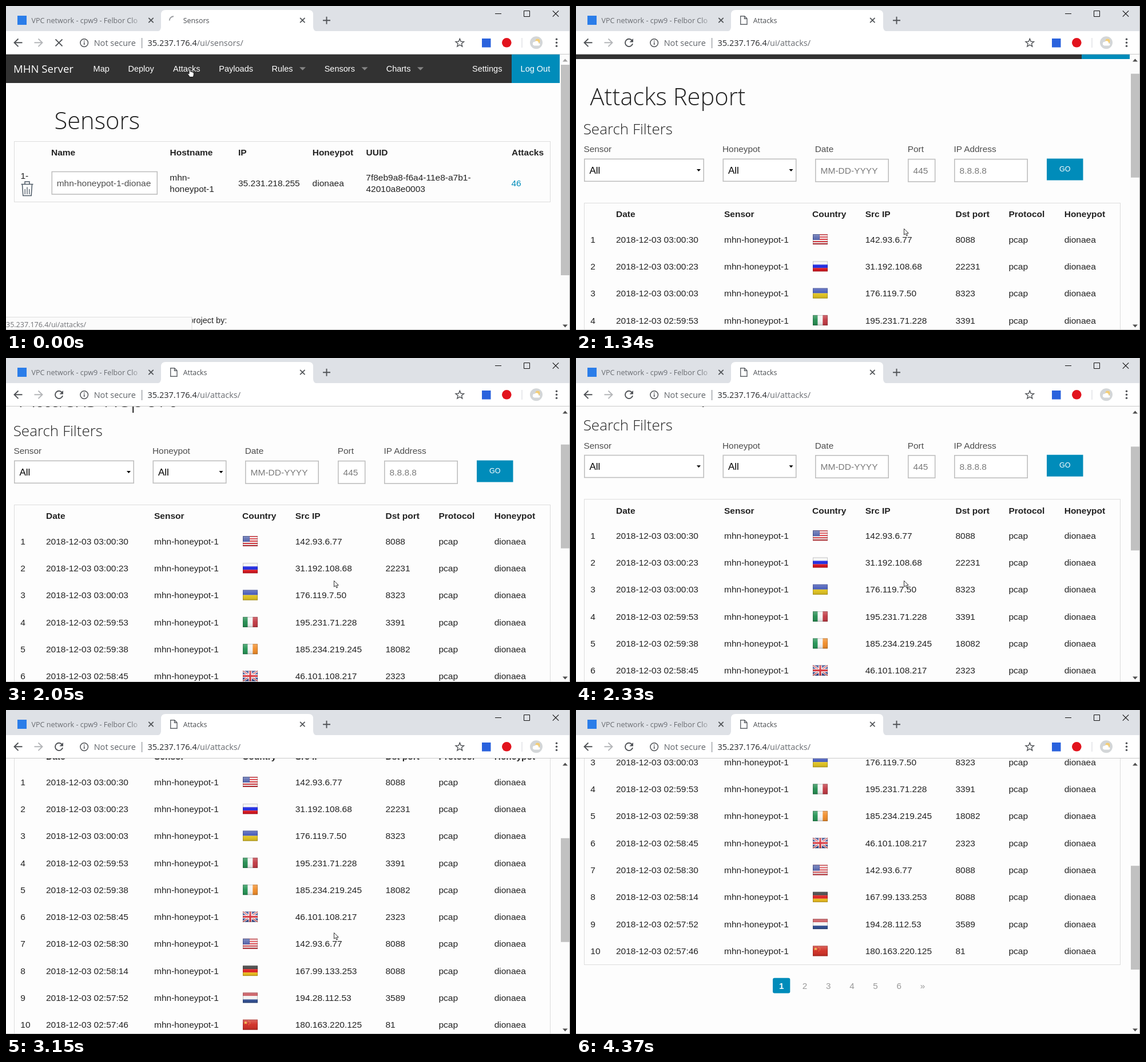
Animation, 986 px wide and 568 px high, one loop 4.62 s. Source, as an HTML page:

```html
<!DOCTYPE html>
<html lang="en">
<head>
<meta charset="utf-8">
<title>Attacks report</title>
<style>
html, body { margin: 0; width: 100%; height: 100%; overflow: hidden; background: #fdfdfd; }
svg { display: block; width: 100vw; height: 100vh; }
text { font-family: "Liberation Sans", Arial, sans-serif; white-space: pre; }
.ui { font-family: "Open Sans", "Noto Sans", sans-serif; }
.light { font-family: "Open Sans", "Noto Sans", sans-serif; font-weight: 300; }
.bold { font-weight: 700; }
.mid { text-anchor: middle; }
</style>
</head>
<body>
<svg id="stage" viewBox="0 0 986 568" preserveAspectRatio="none"></svg>
<script>
const LOOP = 4620;
const INK = '#222', BLUE = '#008cba', ICON = '#505357';

const text = (x, y, str, size = 15.5, fill = INK, cls = '') =>
  `<text x="${x}" y="${y}" font-size="${size}" fill="${fill}" class="${cls}">${str}</text>`;
const rect = (x, y, w, h, fill, more = '') =>
  `<rect x="${x}" y="${y}" width="${w}" height="${h}" fill="${fill}" ${more}/>`;
const line = (d, color = ICON, width = 1.8, more = '') =>
  `<path d="${d}" fill="none" stroke="${color}" stroke-width="${width}" ${more}/>`;
const fill = (d, color) => `<path d="${d}" fill="${color}"/>`;
const dot = (x, y, r, color) => `<circle cx="${x}" cy="${y}" r="${r}" fill="${color}"/>`;
const group = (id, body) => `<g id="${id}">${body}</g>`;
const cross = (x, y, r, color, width) =>
  line(`M${x - r},${y - r}l${2 * r},${2 * r}m0,${-2 * r}l${-2 * r},${2 * r}`, color, width);
const field = (x, y, w, h) => rect(x, y, w, h, '#fff', 'stroke="#bfbfbf" stroke-width="1.6"');
const frame = (y, h) => rect(14.5, y, 937, h, 'none', 'stroke="#ddd"');
const triangle = (x, y, w, h, color) => fill(`M${x - w / 2},${y}h${w}l${-w / 2},${h}z`, color);

// Flags, 26 by 18
const rows = (...c) => c.map((k, i) => rect(0, i * 18 / c.length, 26, 18 / c.length, k)).join('');
const cols = (...c) => c.map((k, i) => rect(i * 26 / c.length, 0, 26 / c.length, 18, k)).join('');
const RED = '#d8323a', PALE = '#f4f4f4';
const flags = {
  us: rows(RED, PALE, RED, PALE, RED, PALE, RED, PALE, RED) + rect(0, 0, 12, 10, '#3f51a0') +
    line('M2,2.5h9M2,5h9M2,7.5h9', '#aab2dc', 1, 'stroke-dasharray="1 1.4"'),
  ru: rows(PALE, '#1a25e0', '#e0121c'),
  ua: rows('#3a4fb4', '#e3c41c'),
  it: cols('#1f8a4c', PALE, '#c0353f'),
  ie: cols('#1f9150', PALE, '#f08a24'),
  gb: rows('#2f4391') + line('M0,0L26,18M26,0L0,18', PALE, 3.6) + line('M0,0L26,18M26,0L0,18', RED, 1.2) +
    line('M13,0V18M0,9H26', PALE, 6) + line('M13,0V18M0,9H26', RED, 3.2),
  de: rows('#2a2a2a', '#dd1c1c', '#f2c21a'),
  nl: rows('#c4454c', PALE, '#2f4f96'),
  cn: rows('#cf2a20') + fill('M5,2.5l1,2h2.2l-1.7,1.4.6,2.1-2.1-1.3-2.1,1.3.6-2.1-1.7-1.4H4z', '#f3c33c') +
    line('M10,2.5h1M12,4.5h1M12,7h1M10,9h1', '#f3c33c', 1),
};
const flag = (name, x, y) => `<g transform="translate(${x} ${y})">${flags[name]}` +
  rect(0, 0, 26, 18, 'url(#gloss)') + rect(.5, .5, 25, 17, 'none', 'stroke="#000" stroke-opacity=".2"') + '</g>';

const attacks = [
  ['03:00:30', 'us', '142.93.6.77', 8088],
  ['03:00:23', 'ru', '31.192.108.68', 22231],
  ['03:00:03', 'ua', '176.119.7.50', 8323],
  ['02:59:53', 'it', '195.231.71.228', 3391],
  ['02:59:38', 'ie', '185.234.219.245', 18082],
  ['02:58:45', 'gb', '46.101.108.217', 2323],
  ['02:58:30', 'us', '142.93.6.77', 8088],
  ['02:58:14', 'de', '167.99.133.253', 8088],
  ['02:57:52', 'nl', '194.28.112.53', 3589],
  ['02:57:46', 'cn', '180.163.220.125', 81],
];

function navBar() {
  const item = (x, s) => text(x, 114.7, s, 14.5, '#fff');
  const menu = x => triangle(x, 107.3, 11, 5.5, '#858585');
  return rect(0, 85, 968, 50, '#323232') + rect(884, 85, 84, 50, BLUE) +
    text(13, 117, 'MHN Server', 18.6, '#fff', 'ui') +
    item(152.6, 'Map') + item(213.5, 'Deploy') + item(292, 'Attacks') + item(372.3, 'Payloads') +
    item(464.5, 'Rules') + menu(518.5) + item(556.7, 'Sensors') + menu(627) +
    item(664.7, 'Charts') + menu(724.5) + item(815, 'Settings') + item(899.6, 'Log Out');
}

function sensorsPage() {
  const head = (x, s) => text(x, 262.3, s, 15.5, INK, 'bold');
  const trash = line('M26.5,312.5h21M33,312v-4h8v4M28.5,313l1.3,19.5h14.4l1.3,-19.5', '#4d5a66', 1.5) +
    line('M33.2,330v-9M37,330v-12.500M40.800,330v-9', '#4d5a66', 1.3);
  return text(84.5, 216, 'Sensors', 41.7, INK, 'light') + frame(237.5, 106) +
    head(79, 'Name') + head(286.5, 'Hostname') + head(406, 'IP') + head(535.7, 'Honeypot') +
    head(629.5, 'UUID') + head(884, 'Attacks') +
    text(25.5, 303, '1-') + trash + field(80.3, 290.5, 184, 39.5) +
    text(88.7, 315.5, 'mhn-honeypot-1-dionae', 15.5, '#4d4d4d') +
    text(286.3, 306, 'mhn-') + text(286.3, 326, 'honeypot-1') +
    text(406, 315.5, '35.231.218.255') + text(535.6, 315.5, 'dionaea') +
    text(629.3, 305.5, '7f8eb9a8-f6a4-11e8-a7b1-') + text(629.5, 325.5, '42010a8e0003') +
    text(883.5, 315.5, '46', 15.5, BLUE) +
    text(13, 556, 'Modern Honey Network is an open', 14.5) + text(319.5, 556, 'project by:', 14.5);
}

function attacksPage() {
  const label = (x, s) => text(x, 298.4, s, 15.4, '#4d4d4d');
  const select = (x, w) => field(x + .8, 310.3, w - 1.6, 39) + text(x + 9.4, 336, 'All', 17, '#000') +
    triangle(x + w - 9.5, 328, 7, 4, '#000');
  const input = (x, w, s) => field(x + .8, 310.6, w - 1.6, 39.4) + text(x + 9.6, 335.6, s, 15.5, '#7a7a7a');
  const xs = [25.3, 70, 259, 413, 505.700, 663.5, 756.5, 853.700];
  const heads = ['', 'Date', 'Sensor', 'Country', 'Src IP', 'Dst port', 'Protocol', 'Honeypot'];
  const body = attacks.map(([time, land, ip, port], i) => {
    const mid = 451.2 + 47.3 * i;
    const cells = [i + 1, '2018-12-03 ' + time, 'mhn-honeypot-1', '', ip, port, 'pcap', 'dionaea'];
    return cells.map((s, k) => text(xs[k], mid + 5.4, s)).join('') + flag(land, 414, mid - 9.2);
  });
  const pages = [2, 3, 4, 5, 6, '»'].map((s, i) => text(400 + 41.2 * i, 943.3, s, 15.2, '#999', 'mid'));
  return text(24.5, 216, 'Attacks Report', 41.7, INK, 'light') +
    text(12.700, 267, 'Search Filters', 26, INK, 'light') +
    label(13.4, 'Sensor') + label(256, 'Honeypot') + label(417.700, 'Date') + label(579.700, 'Port') +
    label(660.5, 'IP Address') + select(14, 210) + select(256.5, 129) +
    input(418, 129, 'MM-DD-YYYY') + input(580, 48.5, '445') + input(661, 129, '8.8.8.8') +
    rect(823, 309.5, 63.5, 38, BLUE) + text(854.8, 332, 'GO', 12.5, '#fff', 'mid') +
    frame(387.5, 513.3) + heads.map((s, i) => text(xs[i], 412.4, s, 15.5, INK, 'bold')).join('') +
    body.join('') + rect(344, 924, 30.3, 26.8, BLUE, 'rx="3"') +
    text(359.2, 943.3, '1', 15.2, '#fff', 'bold mid') + pages.join('');
}

function browser() {
  const tabs = rect(0, 0, 986, 44.5, '#dee1e6') +
    fill('M263,44.500q8,0 8,-8V15q0,-8 8,-8H529q8,0 8,8V36.500q0,8 8,8z', '#fff') +
    rect(20, 17, 16, 16, '#2b7de9') +
    text(44.5, 29.8, 'VPC network - cpw9 - Felbor Clo', 12.6, '#6a6d72', 'ui') +
    rect(218, 12, 24, 26, 'url(#fade)') + rect(241, 12, 30, 26, '#dee1e6') +
    cross(253.5, 25, 4.2, ICON, 1.7) + cross(518.3, 25, 4.2, ICON, 1.7) +
    line('M554,25.200h13M560.500,18.700v13', ICON, 1.9) +
    '<text id="tab" class="ui" x="309.700" y="29.8" font-size="12.4" fill="#4a4d51"></text>' +
    group('pageIcon', line('M287.700,17.700h7l4.300,4.300v10.300h-11.300zM294.500,17.700v4.500h4.500', '#5f6368', 1.4)) +
    group('spinner', line('M285.700,25.500A7.300,7.300 0 0 1 293,18.200', 'currentColor', 2));
  const win = line('M855,13.500h11M905.500,8.500h10v10h-10z', '#111', 1) + cross(961, 13.5, 5.2, '#111', 1.1);
  const arrow = (x, s, c) => line(`M${x - 7 * s},64.300h${14 * s}M${x},57.500l${-7 * s},6.800 ${7 * s},6.800`, c, 1.9);
  const star = Array.from({ length: 10 }, (_, i) => {
    const a = Math.PI * (i / 5 - .5), r = i % 2 ? 3.3 : 7.6;
    return `${i ? 'L' : 'M'}${793.3 + r * Math.cos(a)},${64.9 + r * Math.sin(a)}`;
  }).join('') + 'z';
  const bar = rect(0, 44, 986, 40, '#fff') + rect(0, 84, 986, 1, '#c9c9c9') +
    arrow(21.5, 1, ICON) + arrow(56.5, -1, '#b4b6b9') +
    group('stop', cross(92.5, 64.3, 6, ICON, 1.9)) +
    group('reload', line('M97.500,60A6.600,6.600 0 1 0 99,66', ICON, 1.9) + fill('M100,57v6.500h-6.500z', ICON)) +
    `<circle cx="136.7" cy="64.6" r="6.8" fill="none" stroke="${ICON}" stroke-width="1.5"/>` +
    line('M136.700,63.500v4.700M136.700,60.500v1.700', ICON, 1.6) +
    text(153.7, 70, 'Not secure', 14.5, '#5f6368', 'ui') + rect(237, 56, 1.2, 18, '#8d9196') +
    text(247.5, 70, '35.237.176.4<tspan id="path" fill="#696c71"></tspan>', 14.5, '#26282b', 'ui') +
    line(star, ICON, 1.4) + rect(832, 57, 15.5, 15.5, '#2a62dd') + dot(875.3, 64.3, 8.3, '#e2131d') +
    rect(901.5, 56, 1, 17, '#d4d6d9') +
    dot(927, 64.3, 11, '#d3d6d8') + dot(929.5, 61.5, 4, '#f3cd76') +
    dot(924, 66, 3.2, '#fff') + dot(927.5, 64.8, 3.6, '#fff') + rect(922, 65.5, 11.5, 4, '#fff', 'rx="2"') +
    [58.3, 64.3, 70.3].map(y => dot(962.5, y, 1.75, ICON)).join('');
  return tabs + win + bar;
}

const scrollbar = rect(968, 85, 18, 483, '#fcfcfc') +
  '<path id="up" d="M973,97.500h9l-4.500,-5z"/>' + triangle(977.5, 558.5, 9, 5, '#505050') +
  rect(970, 103, 15, 182, '#c1c1c1', 'id="thumb"');

const bubble = rect(-1, 545.5, 326, 24, '#fbfbfb', 'stroke="#dedede"') +
  '<text id="note" class="ui" x="0" y="563" font-size="12.5" fill="#707276"></text>';

const pointer = group('arrow', '<path d="M.5,.5V11.200L3,8.900 4.800,13 6.600,12.200 4.900,8.300H8.300z" fill="#fff" stroke="#333" stroke-width="1"/>') +
  group('hand', '<path d="M3,9V1.700Q4.200,.2 5.300,1.700V6Q7,5.300 7.500,6.500 9,6 9.500,7.300 11,7 11.300,8.500V11.500Q11,14 9.800,15.500H4.200Q2.500,12.500 .7,10.500 .8,8.500 3,10z" fill="#fff" stroke="#111" stroke-width="1"/>');

document.getElementById('stage').innerHTML = `<defs>
  <linearGradient id="gloss" x2="0" y2="1"><stop stop-color="#fff" stop-opacity=".28"/>
    <stop offset=".5" stop-color="#fff" stop-opacity=".05"/><stop offset="1" stop-opacity=".14"/></linearGradient>
  <linearGradient id="fade"><stop stop-color="#dee1e6" stop-opacity="0"/><stop offset=".9" stop-color="#dee1e6"/></linearGradient>
  </defs>` + rect(0, 0, 986, 568, '#fdfdfd') +
  group('page', navBar() + group('sensors', sensorsPage()) + group('attacks', attacksPage())) +
  scrollbar + group('bubble', bubble) + browser() +
  rect(985, 0, 1, 568, '#b0b0b0') + rect(0, 567, 986, 1, '#c4c4c4') + group('pointer', pointer);

const el = {};
document.querySelectorAll('[id]').forEach(n => el[n.id] = n);
const show = (id, on) => el[id].setAttribute('display', on ? 'inline' : 'none');
const move = (id, x, y) => el[id].setAttribute('transform', `translate(${x} ${y})`);
const at = (steps, t) => steps.findLast(s => s[0] <= t);

// [ms, scroll offset]
const scrolls = [[0, 0], [1340, 42], [1490, 68], [1620, 75.3], [1900, 108], [2050, 130], [2180, 138],
  [2330, 139.8], [2480, 182], [2610, 213], [2760, 228.3], [2880, 236], [3030, 282], [3150, 325],
  [3270, 357], [3390, 371.5], [3660, 422], [3780, 454.3]];
// [ms, x, y]
const pointers = [[0, 317, 109], [120, 324, 118], [240, 352, 152], [370, 400, 218], [490, 455, 292],
  [640, 504, 358], [790, 569, 389], [940, 573, 390], [4060, 478, 377]];
const spins = [[0, 0], [120, -75], [240, -150], [370, 40], [490, 130]];

function draw(t) {
  const loaded = t >= 370, done = t >= 640;
  const offset = at(scrolls, t)[1];
  const [, x, y] = at(pointers, t);
  show('sensors', !loaded);
  show('attacks', loaded);
  move('page', 0, -offset);
  el.thumb.setAttribute('y', 103 + .3745 * offset);
  el.thumb.setAttribute('height', loaded ? 182 : 369);
  el.up.setAttribute('fill', offset ? '#505050' : '#a3a3a3');

  el.tab.textContent = loaded ? 'Attacks' : 'Sensors';
  el.path.textContent = loaded ? '/ui/attacks/' : '/ui/sensors/';
  show('pageIcon', done);
  show('reload', done);
  show('stop', !done);
  show('spinner', !done);
  el.spinner.setAttribute('color', loaded ? '#3b78e7' : '#9a9da1');
  el.spinner.setAttribute('transform', `rotate(${at(spins, t)[1]} 293 25.5)`);

  show('bubble', t < 1060);
  el.note.textContent = t < 240 ? '35.237.176.4/ui/attacks/' : 'Waiting for 35.237.176.4...';
  show('pointer', t < 4370);
  show('hand', t < 240);
  show('arrow', t >= 240);
  move('pointer', x, y);
}

const start = performance.now();
function tick() {
  draw((performance.now() - start) % LOOP);
  requestAnimationFrame(tick);
}
tick();
</script>
</body>
</html>
```
